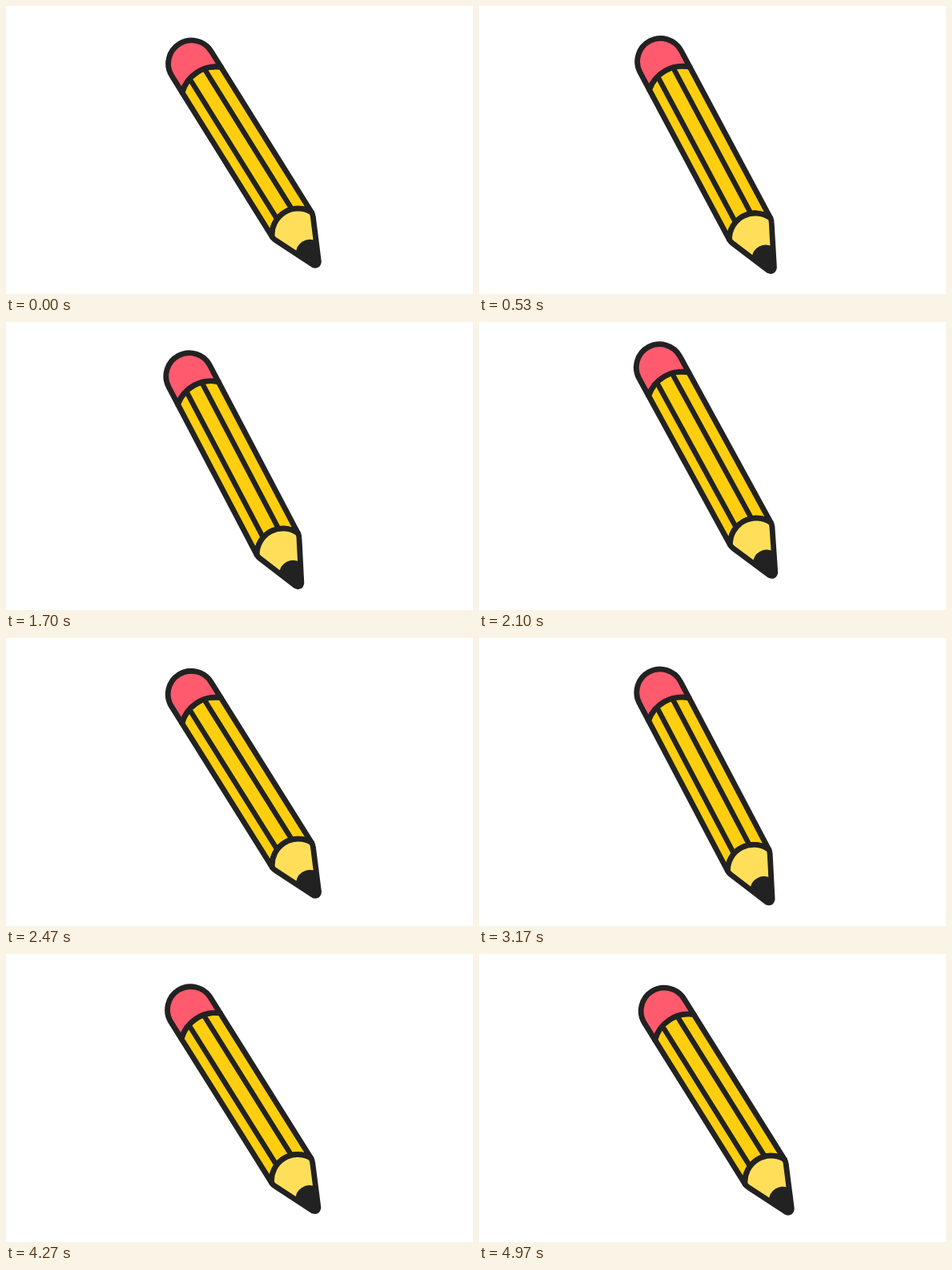
An HTML page that plays this animation: 583 by 360 pixels, repeating every 5.07 s.

```html
<!DOCTYPE html>
<html lang="en">
<head>
<meta charset="utf-8">
<title>Pencil</title>
<style>
  html, body { margin: 0; width: 100%; height: 100%; overflow: hidden; background: #fff; }
  svg { display: block; width: 100%; height: 100%; }
  .line { stroke: #222; stroke-width: 6.8; stroke-linejoin: round; stroke-linecap: round; }
</style>
</head>
<body>
<svg viewBox="0 0 583 360">
  <!-- origin: centre of the eraser cap, y axis runs towards the tip -->
  <g id="pencil" class="line" fill="none">
    <path fill="#fece0f" d="M-29 24.500A44 44 0 0 1 29 23V237A32.500 32.500 0 0 0-29 237Z"/>
    <path stroke-width="6.4" d="M-12 18V221M10.200 18V221"/>
    <path fill="#ff5a6e" d="M-29 24.500V0A29 29 0 0 1 29 0V23A44 44 0 0 0-29 24.500Z"/>
    <path fill="#ffdf5a" d="M-29 237A32.500 32.500 0 0 1 29 237Q29 240 27.500 243L4 294Q0 299-4 294L-27.500 243Q-29 240-29 237Z"/>
    <path fill="#222" stroke="none" d="M-15 271A17 17 0 0 1 15 271L4 294Q0 299-4 294Z"/>
  </g>
</svg>
<script>
  const LOOP = 5070, STEP = 64.1, START = 80;

  // [time, scribble strokes done]: three strokes, then a rest
  const beats = [
    [START, 0], [600, 0.33], [1070, 0.81], [2470, 1.96],
    [3170, 2.32], [3800, 2.73], [4330, 2.98]
  ];

  function strokes(t) {
    const i = beats.findIndex(b => b[0] > t);
    if (i < 0) return beats[beats.length - 1][1];
    if (i === 0) return 0;
    const [t0, p0] = beats[i - 1], [t1, p1] = beats[i];
    return p0 + (p1 - p0) * (t - t0) / (t1 - t0);
  }

  // each stroke is one turn of a loop, with a slow sideways sway
  function pose(p) {
    const c = Math.cos(2 * Math.PI * p), s = Math.sin(2 * Math.PI * p);
    const x = 227.6 + 4 * c + 1.75 * s - 1.8 * Math.sin(Math.PI * p);
    const y = 65.5 + 6.5 * c + 6 * s;
    const lean = 29.5 + 2.4 * c - 0.8 * s;
    return `translate(${x} ${y}) rotate(${-lean})`;
  }

  const pencil = document.getElementById('pencil');

  function draw(now) {
    const t = now % LOOP;
    const tick = START + STEP * Math.floor((t - START) / STEP);
    pencil.setAttribute('transform', pose(strokes(tick + 18)));
    requestAnimationFrame(draw);
  }

  draw(0);
</script>
</body>
</html>
```
